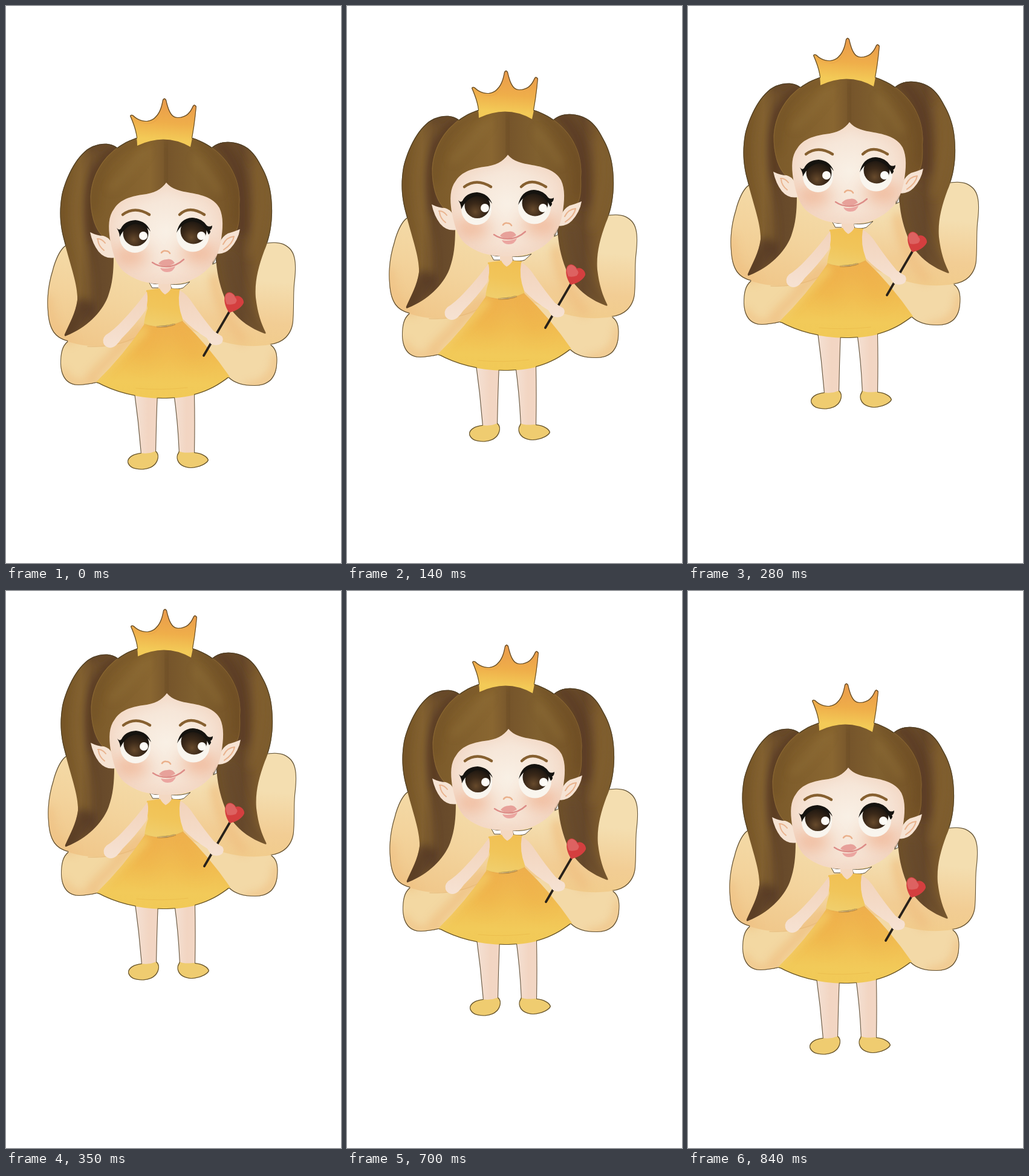
An HTML page for the animation above (910 ms loop, 554x921 px).

```html
<!DOCTYPE html>
<html lang="en">
<head>
<meta charset="utf-8">
<title>Hopping fairy</title>
<style>
html, body { margin: 0; width: 100%; height: 100%; overflow: hidden; background: #fff; }
svg { display: block; position: absolute; left: 0; top: 0; overflow: visible; }
.soft { filter: url(#blur); }
.softer { filter: url(#blurWide); }
</style>
</head>
<body>
<svg id="fairy" width="554" height="921" viewBox="0 0 554 921" fill="none" stroke-linecap="round" stroke-linejoin="round">
<defs>
  <filter id="blur" x="-50%" y="-50%" width="200%" height="200%"><feGaussianBlur stdDeviation="7"/></filter>
  <filter id="blurWide" x="-80%" y="-80%" width="260%" height="260%"><feGaussianBlur stdDeviation="14"/></filter>
  <!-- thin dark line just inside the silhouette -->
  <filter id="edge" filterUnits="userSpaceOnUse" x="50" y="130" width="450" height="660" color-interpolation-filters="sRGB">
    <feMorphology in="SourceAlpha" operator="erode" radius="1" result="core"/>
    <feComposite in="SourceAlpha" in2="core" operator="out" result="rim"/>
    <feFlood flood-color="#493c25" flood-opacity=".85"/>
    <feComposite in2="rim" operator="in" result="line"/>
    <feMerge><feMergeNode in="SourceGraphic"/><feMergeNode in="line"/></feMerge>
  </filter>

  <linearGradient id="wingL" x1=".7" y1="0" x2=".3" y2="1"><stop offset=".1" stop-color="#f4dcaa"/><stop offset=".55" stop-color="#f3d39c"/><stop offset="1" stop-color="#f0c78a"/></linearGradient>
  <linearGradient id="wingR" x1=".6" y1="0" x2=".5" y2="1"><stop offset=".35" stop-color="#f4deb0"/><stop offset=".75" stop-color="#f2cd94"/><stop offset="1" stop-color="#f1cc8c"/></linearGradient>
  <linearGradient id="tailL"><stop offset="0" stop-color="#755426"/><stop offset=".35" stop-color="#805f30"/><stop offset=".55" stop-color="#65472a"/><stop offset="1" stop-color="#6d4f2c"/></linearGradient>
  <linearGradient id="tailR"><stop offset=".2" stop-color="#6d4f2b"/><stop offset=".5" stop-color="#65472a"/><stop offset=".75" stop-color="#7c5a2d"/><stop offset="1" stop-color="#7d5d2f"/></linearGradient>
  <linearGradient id="cap"><stop offset="0" stop-color="#7b5a2a"/><stop offset=".4" stop-color="#896631"/><stop offset=".52" stop-color="#76552b"/><stop offset=".7" stop-color="#80602f"/><stop offset="1" stop-color="#745227"/></linearGradient>
  <linearGradient id="gold" x1=".55" y1="0" x2=".45" y2="1"><stop offset=".1" stop-color="#ea9d4b"/><stop offset=".5" stop-color="#efae4a"/><stop offset=".85" stop-color="#f3ca57"/></linearGradient>
  <linearGradient id="top" x1=".6" y1="0" x2=".4" y2="1"><stop offset="0" stop-color="#f1c053"/><stop offset=".5" stop-color="#f1c55a"/><stop offset="1" stop-color="#f0ce6c"/></linearGradient>
  <linearGradient id="skirt" x1=".55" y1="0" x2=".5" y2="1"><stop offset="0" stop-color="#efb14f"/><stop offset=".45" stop-color="#f1bd51"/><stop offset=".8" stop-color="#f2ca59"/><stop offset="1" stop-color="#f1c956"/></linearGradient>
  <linearGradient id="leg"><stop offset="0" stop-color="#f4e1d4"/><stop offset=".6" stop-color="#f2d5c2"/><stop offset="1" stop-color="#f2d6c4"/></linearGradient>
  <linearGradient id="arm" x1="0" y1="0" x2="0" y2="1"><stop offset="0" stop-color="#f2d3bb"/><stop offset=".5" stop-color="#f4dac6"/><stop offset="1" stop-color="#f6e2d3"/></linearGradient>
  <radialGradient id="skin" cx=".5" cy=".48" r=".58"><stop offset="0" stop-color="#f9f0e5"/><stop offset=".55" stop-color="#f6e6d8"/><stop offset="1" stop-color="#f4d9c6"/></radialGradient>
  <radialGradient id="iris" cx=".42" cy=".75" r=".75"><stop offset="0" stop-color="#674a2c"/><stop offset=".45" stop-color="#3b2919"/><stop offset="1" stop-color="#14110e"/></radialGradient>

  <path id="wing1" d="M262 395H110C96 388 84 410 77 436C70 458 67 480 69 505C71 537 82 549 101 554C132 566 180 567 232 545L262 520Z"/>
  <path id="wing2" d="M262 425L345 425L425 393C446 388 462 391 471 402C480 413 480 430 478 452C475 474 477 497 475 522C473 543 459 558 436 560C405 565 370 562 330 545L262 520Z"/>
  <path id="wing3" d="M250 530L102 554C92 562 90 574 90 592C91 615 102 627 120 627Q136 626 149 623L240 640Z"/>
  <path id="wing4" d="M290 530L437 559C449 567 449 579 448 594C446 617 433 628 411 628C390 628 378 624 367 614L290 630Z"/>
  <path id="pigL" d="M185 235C174 226 159 226 143 232C118 243 99 282 92 313C87 343 90 366 96 388C106 428 119 461 118 486C115 508 105 525 97 543Q96 547 100 545C133 532 158 507 168 482C176 461 178 440 178 415L172 340Z"/>
  <path id="pigR" d="M339 235C350 225 367 221 389 229C405 235 415 250 422 264C434 285 441 308 440 345C439 371 434 389 427 405C417 432 411 456 413 482C416 508 422 525 429 539Q431 543 426 541C398 530 376 513 363 486C354 464 348 442 347 412L350 340Z"/>
  <path id="hair" d="M174 389C156 384 143 364 140 329C135 272 178 211 262 211C346 211 392 272 386 329C387 355 385 369 378 375C372 383 364 388 354 390L265 420Z"/>
  <path id="face" d="M172 386C169 365 169 348 179 335C189 320 205 315 225 312C245 310 257 303 265 292C274 303 288 306 305 309C330 313 345 320 353 334C360 349 359 368 355 391C350 415 343 427 329 439C310 455 288 461 262 460C234 460 212 453 196 440C181 427 177 409 172 386Z"/>
  <path id="dress" d="M229 526Q260 537 292 521Q335 562 370 613C335 641 300 649 258 649C215 648 180 639 149 622Q195 577 229 526Z"/>
  <path id="crown" d="M205 182Q206 178 211 181C221 191 237 194 247 183C255 175 257 165 259 155Q262 150 265 155C268 167 272 184 284 184C297 184 304 176 308 167Q311 160 315 166C313 188 310 211 305 233Q263 209 217 231C217 213 212 198 205 182Z"/>
  <clipPath id="inFace"><use href="#face"/></clipPath>
  <clipPath id="inHair"><use href="#hair"/></clipPath>
  <clipPath id="inDress"><use href="#dress"/></clipPath>
  <clipPath id="inPigL"><use href="#pigL"/></clipPath>
  <clipPath id="inPigR"><use href="#pigR"/></clipPath>
  <clipPath id="inWings"><use href="#wing1"/><use href="#wing2"/><use href="#wing3"/><use href="#wing4"/></clipPath>
</defs>

<g filter="url(#edge)">
  <!-- wings -->
  <use href="#wing3" fill="#f3d8a2"/>
  <use href="#wing4" fill="#f3d9a7"/>
  <use href="#wing1" fill="url(#wingL)"/>
  <use href="#wing2" fill="url(#wingR)"/>
  <g clip-path="url(#inWings)">
    <g class="soft" stroke="#efc082" stroke-width="12" opacity=".75">
      <path d="M70 485Q76 545 108 553M94 605Q105 632 150 622M447 580Q445 625 400 629M180 560Q215 555 240 530"/>
      <path d="M140 615L220 535M345 450Q350 500 390 550" stroke-width="18"/>
    </g>
    <path d="M135 563Q190 566 231 538" stroke="#e5b878" stroke-width="1.5" opacity=".7"/>
  </g>

  <!-- legs and shoes -->
  <path d="M212 640H251Q249 685 248 742H223Q219 690 212 640Z" fill="url(#leg)"/>
  <path d="M277 640H312Q313 690 312 742H286Q284 690 277 640Z" fill="url(#leg)"/>
  <g fill="#efcc70">
    <path d="M222 739C235 741 242 738 248 736C254 740 253 751 247 758C238 768 219 768 209 764C196 757 198 742 222 739Z"/>
    <path d="M286 736C293 740 305 738 312 738C324 739 334 745 335 751C333 757 321 763 307 764C291 764 280 755 283 742Z"/>
  </g>

  <!-- ponytails -->
  <use href="#pigL" fill="url(#tailL)"/>
  <g clip-path="url(#inPigL)" class="soft">
    <path d="M142 245Q104 300 121 390Q139 440 135 490" stroke="#87652f" stroke-width="13" opacity=".55"/>
    <path d="M180 240Q125 285 145 385" stroke="#56381f" stroke-width="16" opacity=".8"/>
    <path d="M95 550L128 500" stroke="#4f3423" stroke-width="34" opacity=".7"/>
  </g>
  <use href="#pigR" fill="url(#tailR)"/>
  <g clip-path="url(#inPigR)" class="soft">
    <path d="M355 230Q398 270 390 370" stroke="#58391f" stroke-width="22" opacity=".75"/>
    <path d="M418 270Q434 330 405 410" stroke="#82602d" stroke-width="14" opacity=".6"/>
    <path d="M370 420Q380 490 420 535" stroke="#664a2c" stroke-width="18" opacity=".6"/>
  </g>

  <!-- neck gaps -->
  <g fill="#fff" stroke="#493c25" stroke-width=".9">
    <path d="M237 457Q246 461 254 459L253 466L242 466Z"/>
    <path d="M272 460Q290 462 304 456L293 466Q285 469 274 467Z"/>
    <path d="M347 417L348 424L342 427Z"/>
  </g>

  <!-- dress -->
  <use href="#dress" fill="url(#skirt)"/>
  <g clip-path="url(#inDress)">
    <path class="softer" d="M250 535L225 580M285 530L315 580" stroke="#eea743" stroke-width="18" opacity=".45"/>
    <path class="soft" d="M150 615L228 535" stroke="#f3cd68" stroke-width="14" opacity=".85"/>
    <path d="M215 632Q255 636 300 631" stroke="#e5b043" stroke-width="1" opacity=".45"/>
  </g>
  <path d="M252 456H272L274 478H252Z" fill="#f4d8c2"/>
  <path d="M232 470L254 467Q257 473 263 477Q270 473 273 467L288 468Q285 490 292 497V521Q262 535 228 527Q229 515 234 500Q231 485 232 470Z" fill="url(#top)"/>
  <path d="M229 526Q260 537 292 521" stroke="#e3a243" stroke-width="1.5" opacity=".45"/>

  <!-- arms and wand -->
  <path d="M233 472Q214 498 192 521Q178 536 165 544Q157 552 163 561Q172 569 182 561Q187 556 191 550Q214 527 231 503Q236 487 233 472Z" fill="url(#arm)"/>
  <path d="M369 506L327 578" stroke="#28211a" stroke-width="3.8"/>
  <path d="M287 470Q299 476 309 492Q327 518 343 537Q350 542 357 546Q361 552 356 558Q349 563 339 559Q335 555 332 549Q309 535 292 517Q283 494 287 470Z" fill="url(#arm)"/>
  <path d="M369 507C362 497 359 485 363 477C368 470 376 474 379 480C386 477 394 484 393 491C389 500 378 505 369 507Z" fill="#d43f3f"/>
  <path d="M365 493Q358 476 370 474Q377 476 379 482Q384 486 379 492Q371 495 365 493Z" fill="#dd6261"/>

  <!-- head -->
  <use href="#hair" fill="url(#cap)"/>
  <g clip-path="url(#inHair)">
    <path class="soft" d="M145 335Q145 245 235 218" stroke="#6c4b22" stroke-width="9" opacity=".55"/>
    <path class="soft" d="M380 355Q392 275 315 222" stroke="#694822" stroke-width="10" opacity=".6"/>
    <path class="soft" d="M263 230Q269 260 264 295" stroke="#664822" stroke-width="9" opacity=".6"/>
    <path class="soft" d="M230 240Q205 275 175 300M315 255Q335 280 350 305" stroke="#907039" stroke-width="13" opacity=".45"/>
    <use href="#hair" stroke="#97733c" stroke-width="2" opacity=".55"/>
  </g>
  <g fill="#f6e3d3">
    <path d="M139 374Q151 380 161 380Q169 382 174 390L180 416Q164 419 153 406Q143 393 139 374Z"/>
    <path d="M387 369Q375 374 367 376Q358 381 354 390L346 409Q360 412 371 401Q384 387 387 369Z"/>
  </g>
  <g stroke="#e9b38e" stroke-width="2">
    <path d="M151 385Q158 384 164 392M152 387Q153 397 162 404"/>
    <path d="M377 381Q365 382 359 394M377 381Q375 393 360 403"/>
  </g>
  <use href="#face" fill="url(#skin)"/>
  <g clip-path="url(#inFace)">
    <g class="softer" fill="#eea57f" opacity=".75">
      <ellipse cx="206" cy="413" rx="29" ry="15"/>
      <ellipse cx="319" cy="408" rx="29" ry="16"/>
    </g>
    <use href="#face" class="soft" stroke="#f0cdb5" stroke-width="4" opacity=".6"/>
  </g>

  <!-- eyes -->
  <g fill="#f9f5ee">
    <ellipse cx="213" cy="382" rx="25" ry="26"/>
    <ellipse cx="309" cy="379" rx="27" ry="27.500"/>
  </g>
  <g fill="url(#iris)">
    <circle cx="214.500" cy="376" r="21"/>
    <circle cx="310" cy="372" r="21.500"/>
  </g>
  <g fill="#fdfbf6">
    <circle cx="227" cy="380" r="7"/>
    <circle cx="323" cy="380" r="7"/>
  </g>
  <g fill="#15130f">
    <path d="M183 367Q187 372 190 368Q196 355 214 354Q233 356 239 373Q231 361 214 360Q197 363 188 382Q188 375 183 367Z"/>
    <path d="M282 375Q287 351 308 350Q324 351 332 363Q336 366 341 363Q341 369 337 371Q340 373 335 378Q327 358 308 356Q291 358 282 375Z"/>
  </g>
  <path d="M193 345Q213 330 237 345M287 345Q303 329 328 345" stroke="#866030" stroke-width="4.500"/>

  <!-- nose and mouth -->
  <path d="M257 408Q260 404 264 405Q269 405 271 409" stroke="#eab08b" stroke-width="2.6"/>
  <path d="M252 426Q257 419 266 419Q274 417 279 425Q270 431 266 430Q257 430 252 426Z" fill="#e7a19a"/>
  <path d="M255 433Q267 436 280 430Q277 440 266 440Q258 440 255 433Z" fill="#eba5a0"/>
  <path d="M242 424Q252 431 265 431Q281 431 294 419" stroke="#dd8d88" stroke-width="2.4"/>

  <!-- crown -->
  <use href="#crown" fill="url(#gold)"/>
  <path d="M220 190Q242 201 252 184" stroke="#e0984a" stroke-width="1.2" opacity=".35"/>
</g>
</svg>
<script>
// [time in ms, x, y]; each pose holds until the next
const LOOP = 910;
const poses = [
  [0, 0, 0], [70, 1, -27], [140, 1, -46], [210, 2, -73], [280, 2, -100], [350, 1, -123],
  [630, 2, -100], [700, 2, -64], [770, 1, -27], [840, 0, 0], [LOOP, 0, 0]
];
document.getElementById('fairy').animate(
  poses.map(([t, x, y]) => ({ offset: t / LOOP, transform: `translate(${x}px, ${y}px)`, easing: 'step-end' })),
  { duration: LOOP, iterations: Infinity }
);
</script>
</body>
</html>
```
